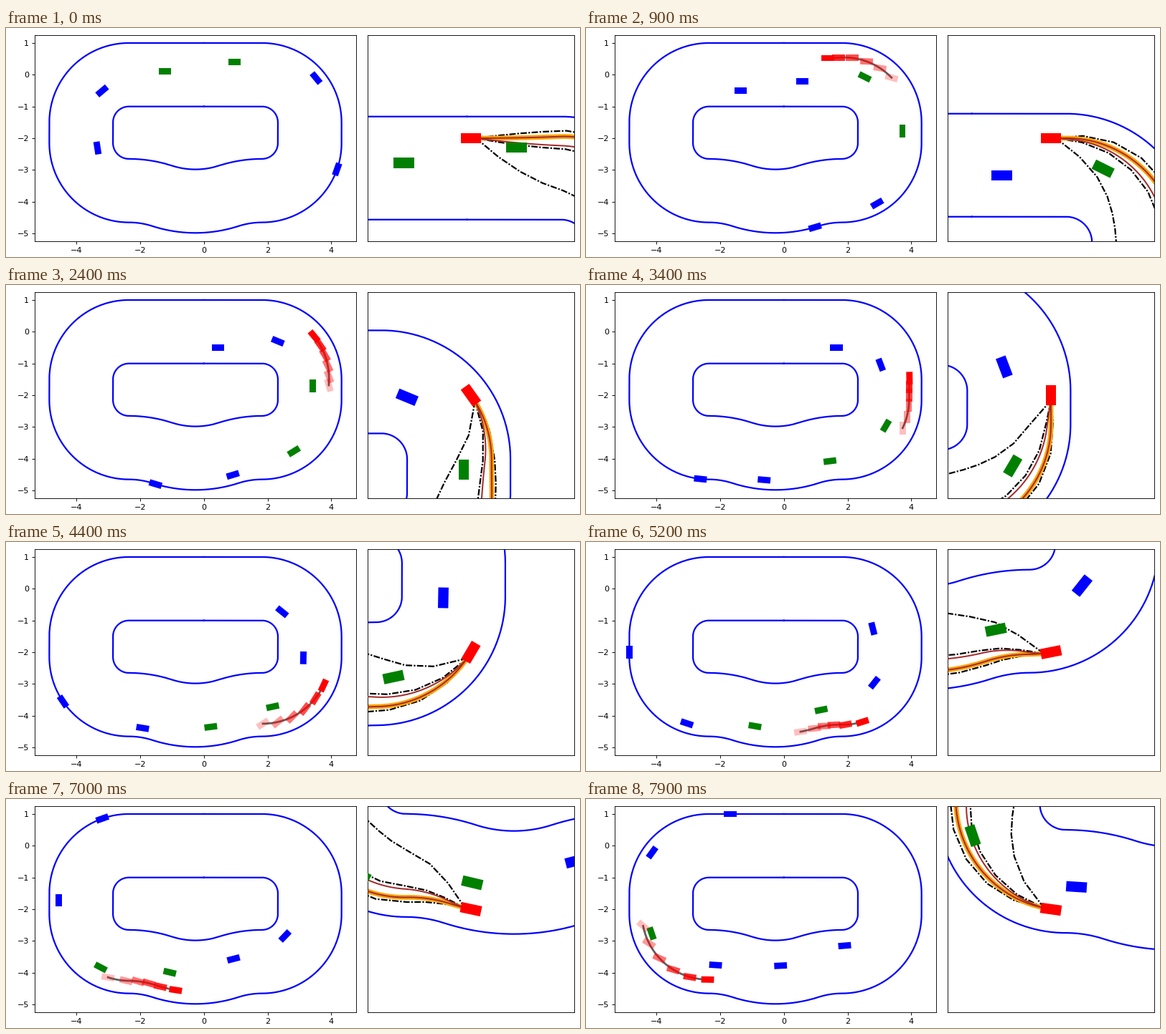
A matplotlib script for the animation above (8 s loop, 800 by 320 pixels).

```python
import numpy as np
import matplotlib.pyplot as plt
from matplotlib.animation import FuncAnimation
from matplotlib.patches import Polygon

FRAMES, INTERVAL = 80, 100
CAR_L, CAR_W = 0.4, 0.2

# Centre line, driven clockwise from (0, 0): (length, curvature)
BEND_R = 1.045 / np.sin(np.pi / 10)
TURN = (0.75 * np.pi, -1 / 1.5)
OUT = (BEND_R * np.pi / 10, 1 / BEND_R)
IN = (BEND_R * np.pi / 10, -1 / BEND_R)
SIDE = (0.65, 0)
LAYOUT = [(1.825, 0), TURN, SIDE, TURN, OUT, IN, IN, OUT,
          TURN, SIDE, TURN, (2.355, 0)]


def advance(x, y, h, k, d):
    if k == 0:
        return x + d * np.cos(h), y + d * np.sin(h), h
    g = h + k * d
    return x + (np.sin(g) - np.sin(h)) / k, y - (np.cos(g) - np.cos(h)) / k, g


segments, lap, state = [], 0.0, (0.0, 0.0, 0.0)
for length, k in LAYOUT:
    segments.append((lap, state, k))
    state = advance(*state, k, length)
    lap += length


def pose(s, e):
    """Position and heading at progress s, offset e to the outside."""
    s %= lap
    start, base, k = [seg for seg in segments if seg[0] <= s][-1]
    x, y, h = advance(*base, k, s - start)
    return x - e * np.sin(h), y + e * np.cos(h), h


def path(ss, es):
    return np.array([pose(s, e)[:2] for s, e in zip(ss, es)]).T


def car_shape(x, y, h):
    c, s = np.cos(h), np.sin(h)
    box = np.array([(-1, -1), (1, -1), (1, 1), (-1, 1)]) * (CAR_L / 2, CAR_W / 2)
    return box @ np.array([(c, s), (-s, c)]) + (x, y)


# Key points of the red car's run: progress and offset
STEPS = np.array([0, 9, 24, 34, 44, 60, 79])
DRIVE = np.array([(0.08, 0.58), (1.53, 0.524), (3.25, 0.633), (4.27, 0.62),
                  (5.63, 0.63), (8.256, 0.644), (11.645, 0.56)])
SLOPES = np.gradient(DRIVE, STEPS, axis=0)


def drive(n):
    """Smooth run through the key points."""
    i = min(np.searchsorted(STEPS, n, side="right") - 1, len(STEPS) - 2)
    w = STEPS[i + 1] - STEPS[i]
    u = (n - STEPS[i]) / w
    rise = u * u * (3 - 2 * u)
    return (DRIVE[i] + rise * (DRIVE[i + 1] - DRIVE[i])
            + w * u * (1 - u) ** 2 * SLOPES[i]
            - w * u * u * (1 - u) * SLOPES[i + 1])


# Evenly spaced traffic, one car per lane, outer lanes slightly faster
LANES = np.arange(6)
OFFSETS = -0.5 + 0.3 * LANES
LINE_UP = -5.597 + 2.187 * LANES


def traffic(n):
    return -1.36 + 1.94 * LANES + (0.1203 + 0.002 * LANES) * (n - 9)


fig = plt.figure(figsize=(10, 4), dpi=80)
world = fig.add_axes([40 / 800, 22 / 320, 448 / 800, 288 / 320])
view = fig.add_axes([504 / 800, 22 / 320, 288 / 800, 288 / 320])
world.set(xlim=(-5.314, 4.783), ylim=(-5.244, 1.247),
          xticks=range(-4, 5, 2), yticks=range(-5, 2))
view.set(xticks=[], yticks=[])

around = np.linspace(0, lap, 900)
for ax in (world, view):
    for edge in (1, -1):
        ax.plot(*path(around, np.full(900, edge)), color="blue", lw=2, zorder=1)


def add_car(ax, color, alpha=1, z=4):
    return ax.add_patch(Polygon(np.zeros((4, 2)), fc=color, ec="none",
                                alpha=alpha, zorder=z))


def add_line(ax, color, lw, z, style="-"):
    return ax.plot([], [], ls=style, color=color, lw=lw, zorder=z)[0]


cars = [[add_car(ax, "blue") for ax in (world, view)] for _ in LANES]
ghosts = [add_car(world, "red", a, 6) for a in np.linspace(1, 0.25, 6)]
trail = add_line(world, "#606060", 2.5, 5)
ego = add_car(view, "red", z=6)
options = [add_line(view, "black", 2, 2, (0, (4, 1, 1, 1))) for _ in range(3)]
best = add_line(view, "orange", 6, 2.5)
browns = [add_line(view, "brown", 1.8, 3) for _ in range(2)]

REACH, SETTLE = 3.0, 2.4
COARSE = np.linspace(0, REACH, 8)
FINE = np.linspace(0, REACH, 40)


def plan(s, e, end, ahead, late=False):
    """Path from offset e to end; late plans change lane at the end."""
    u = np.clip(ahead / SETTLE, 0, 1)
    ease = u ** 2 if late else 1 - (1 - u) ** 2
    return path(s + ahead, e + (end - e) * ease)


def draw_plans(s, e):
    for line, end in zip(options, (0.74, 0.35, -0.53)):
        line.set_data(*plan(s, e, end, COARSE))
    for line in (best, browns[0]):
        line.set_data(*plan(s, e, 0.65, FINE, late=True))
    browns[1].set_data(*plan(s, e, 0.42, FINE))


def draw_preview(n):
    """Fading cars ahead of the previous position, turning in late."""
    s, e = drive(max(n - 1, 0))
    span = 11.5 * (drive(n)[0] - s)
    for ghost, u in zip(ghosts, np.linspace(0, 1, 6)):
        x, y, _ = pose(s + span * u, e + (0.6 - e) * u)
        ghost.set_xy(car_shape(x, y, pose(s + span * u / 2, 0)[2]))
    u = np.linspace(0, 1, 21)
    trail.set_data(*path(s + span * u, e + (0.6 - e) * u))
    for art in ghosts + [trail]:
        art.set_visible(n > 0)


def update(n):
    s, e = drive(n)
    ahead = traffic(n) - s
    places = traffic(n) if n else LINE_UP
    for pair, place, offset, gap in zip(cars, places, OFFSETS, ahead):
        shape = car_shape(*pose(place, offset))
        for patch in pair:
            patch.set_xy(shape)
            patch.set_facecolor("green" if -0.2 < gap < 3.5 else "blue")

    draw_preview(n)
    draw_plans(s + 0.1, e)

    x, y, h = pose(s, e)
    ego.set_xy(car_shape(x, y, h))
    view.set(xlim=(x - 2, x + 2), ylim=(y - 2, y + 2))
    return []


anim = FuncAnimation(fig, update, frames=FRAMES, interval=INTERVAL,
                     repeat=True, repeat_delay=0)
plt.show()
```
